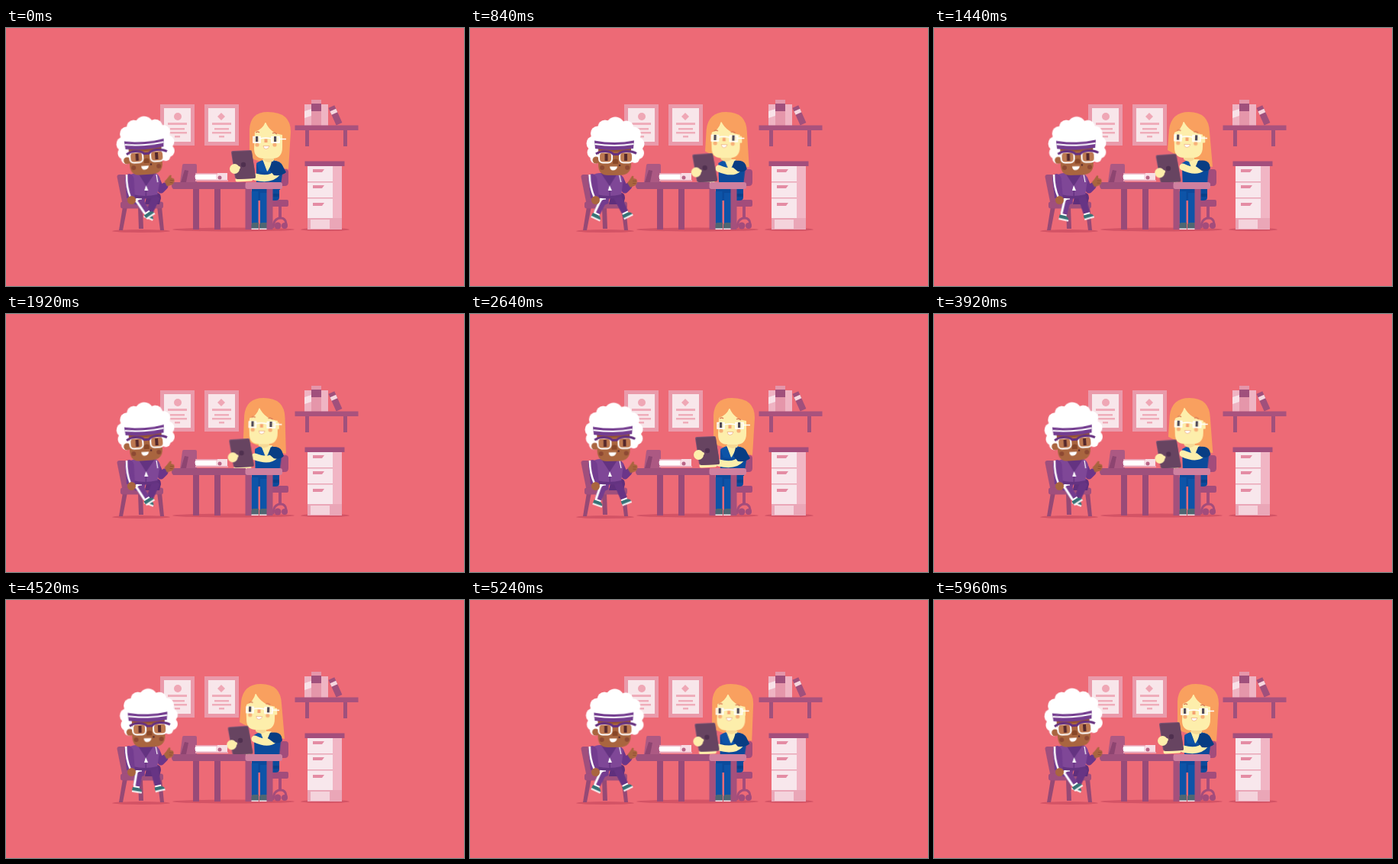
Recreate the animation shown at these times as an HTML page. Size 600x338 px, loop 6 s.

```html
<!DOCTYPE html>
<html lang="en">
<head>
<meta charset="utf-8">
<title>Consultation</title>
<style>
html, body { margin: 0; width: 100%; height: 100%; overflow: hidden; background: #ed6a76; }
svg { display: block; width: 100vw; height: 100vh; }

/* Each moving part sets its two poses: --a (start) and --b (far end). */
.man { animation: sway 1s cubic-bezier(.37,0,.63,1) infinite alternate; }
.leg { animation: kick 2s cubic-bezier(.37,0,.63,1) infinite; }
.nurse { animation: turn 3s cubic-bezier(.37,0,.63,1) infinite; }
.bend { animation: bend 3s cubic-bezier(.37,0,.63,1) infinite; }
@keyframes sway { from { transform: var(--a); } to { transform: var(--b); } }
@keyframes kick {
  0%, 100% { transform: var(--a); }
  40%, 60% { transform: var(--b); }
}
@keyframes turn {
  0%, 5.3%, 83.3%, 100% { transform: var(--a); }
  36%, 50% { transform: var(--b); }
}
@keyframes bend {
  0%, 5.3%, 83.3%, 100% { d: var(--a); }
  36%, 50% { d: var(--b); }
}

#manHead { transform-origin: 190px 180px; --a: translate(-6px,-1px) rotate(-4deg); --b: translate(.5px,0); }
#manBody { transform-origin: 181px 222px; --a: skewX(-2deg); --b: skewX(1deg); }
#thumb { transform-origin: 207px 208px; --a: translate(1px,-2px) rotate(7deg); --b: translate(0,0); }
#legL { transform-origin: 174px 226px; --a: rotate(-34deg); --b: rotate(25deg); }
#legR { transform-origin: 195px 225px; --a: rotate(23deg); --b: rotate(-26deg); }

#hairBack { --a: path("M319 133 Q320 110 343 110 Q373 110 373 136 L370 185 Q345 180 319 170 Z");
            --b: path("M308 133 Q311 110 334 110 Q360 110 361 136 L365 182 Q338 178 306 160 Z"); }
#face { --a: translate(0,0); --b: translate(-10px,-1px); }
#features { --a: translate(0,0); --b: translate(-9px,-2px) rotate(2deg); transform-origin: 341px 147px; }
#fringe { --a: path("M321 140 Q320 111 343 111 Q372 111 371 139 L368 168 L362 172 L362 140 Q346 138 340 123 Q336 133 326 136 L325 158 L321 158 Z");
          --b: path("M310 140 Q311 111 334 111 Q360 111 360 139 L362 168 L356 172 L355 140 Q335 138 327 122 Q324 134 315 137 L312 158 L308 156 Z"); }
#torso { transform-origin: 342px 212px; --a: translate(0,0); --b: translate(-2px,0) skewX(2deg); }
#sleeve { --a: path("M348 175 Q358 174 362 180 L367 189 Q362 194 351 193 L345 186 Z");
          --b: path("M346 174 Q358 172 361 179 L362 184 Q358 189 351 187 L343 181 Z"); }
#forearm { --a: path("M355 190 Q347 200 326 195"); --b: path("M351 183 Q343 190 326 182"); }
#tablet { transform-origin: 311px 179px; --a: translate(0,0); --b: translate(-4px,5px) rotate(-1.5deg); }
</style>
</head>
<body>
<svg viewBox="0 0 600 338" preserveAspectRatio="none">
  <rect width="600" height="338" fill="#ed6a76"/>

  <g fill="#d35365">
    <ellipse cx="177" cy="266" rx="38" ry="2"/>
    <ellipse cx="298" cy="264" rx="80" ry="2.5"/>
    <ellipse cx="418" cy="264" rx="32" ry="2"/>
  </g>

  <!-- certificates -->
  <defs>
    <g id="cert">
      <path fill="#ea9aaa" d="M0 0h45v54H0z"/>
      <path fill="#f8e6ea" d="M5 5h35v44H5z"/>
      <path fill="#efadba" d="M10 24h25v3H10zM13 31h19v2.500H13zM10 36h25v2.500H10zM19 41h7v2.500h-7z"/>
    </g>
  </defs>
  <use href="#cert" x="202" y="100"/>
  <circle cx="225" cy="116" r="5" fill="#efa7b5"/>
  <use href="#cert" x="260" y="100"/>
  <path fill="#efa7b5" d="M282 111l5 5-5 5-5-5z"/>

  <!-- shelf -->
  <path fill="#efb4c3" d="M391 100h9v28h-9z"/>
  <path fill="#f8e2e8" d="M391 109l9-3v9l-9 3z"/>
  <path fill="#e596aa" d="M400 94h13v34h-13z"/>
  <path fill="#a0507c" d="M400 99h13v10h-13z"/>
  <path fill="#efb4c3" d="M413 100h9v28h-9z"/>
  <g transform="rotate(-24 431 114)">
    <path fill="#a0507c" d="M427 102h8.500v25H427z"/>
    <path fill="#f6d7df" d="M427 107h8.500v5H427z"/>
  </g>
  <path fill="#a9527d" d="M378.500 127.500h83v6.500h-83z"/>
  <path fill="#a0507c" d="M392 134h5v21h-5zM442 134h5v21h-5z"/>

  <!-- cabinet -->
  <path fill="#f1b5c4" d="M395 180h45v70h-45z"/>
  <path fill="#eaa6b7" d="M395 250h45v14h-45z"/>
  <path fill="#f8e7ec" d="M395 181h33v68h-33z"/>
  <path fill="#f4d3dc" d="M399 251h25v12h-25z"/>
  <path fill="#eaa6b7" d="M395 201h33v1.500h-33zM395 222h33v1.500h-33zM395 249h45v2h-45z"/>
  <path fill="#e48ca4" d="M402 185h15l-3 4h-12zM402 206h15l-3 4h-12zM402 229h15l-3 4h-12z"/>
  <path fill="#a34e7c" d="M391.500 174.500h52v6.500h-52z"/>

  <!-- office chair -->
  <g fill="#a34c7b">
    <path d="M357 185h9q4 0 4 4v13q0 5-5 5h-8z"/>
    <rect x="343" y="225" width="27" height="9" rx="2"/>
    <path d="M357 233h4v16h-4z"/>
    <path d="M350 262q0-13 10-13q7 0 7 9" fill="none" stroke="#a34c7b" stroke-width="3"/>
    <circle cx="356" cy="259" r="4.500"/>
    <circle cx="365" cy="259" r="4"/>
  </g>

  <!-- nurse -->
  <path class="bend" id="hairBack" fill="#f9a05f"/>
  <g id="nurseLegs">
    <path fill="#0b4a9b" d="M322 210h36v12q0 4-5 4h-25l-6-4z"/>
    <path fill="#0d54a8" d="M321.500 214h9v42h-9zM333 216h9v40h-9z"/>
    <path fill="#08408a" d="M342 217h16v4h-16z"/>
    <path fill="#4f6672" d="M321 264v-6q0-3 4-3h6v9zM332 264v-6q0-3 4-3h6v9z"/>
    <path fill="#f8e5eb" d="M321 262.500h10v1.500h-10zM332 262.500h10v1.500h-10z"/>
  </g>
  <g class="nurse" id="torso">
    <path fill="#0b4a9b" d="M328 179q2-5 9-5h17q9 2 9 11l-4 27h-31z"/>
    <path fill="#fdeeab" d="M336 172h15l-4 13-5 3z"/>
    <path fill="#0d54a8" d="M336 173l-8 4 4 11 10 1zM351 173l3 3-7 13h-5z"/>
  </g>
  <g class="nurse" id="face">
    <path fill="#f6d995" d="M337 164h14v9q-7 6-14 0z"/>
    <path fill="#fdeeab" d="M324 124h38v32q0 15-13 15h-11q-13 0-13-13z"/>
    <circle cx="363" cy="147" r="4.500" fill="#fdeeab"/>
  </g>
  <path class="bend" id="fringe" fill="#f9a05f"/>
  <g class="nurse" id="features">
    <g fill="#f7b077">
      <circle cx="329" cy="153" r="2.600"/>
      <circle cx="352" cy="153" r="2.600"/>
    </g>
    <path fill="none" stroke="#dc7f58" stroke-width="1.400" d="M327 137q3-2 5 0M349 138q3-2 6 1"/>
    <path fill="#fff" fill-opacity=".45" stroke="#fff" stroke-width="1.500" d="M324 142.500h9v7.500h-9zM348 142.500h10v7.500h-10z"/>
    <path fill="none" stroke="#fff" stroke-width="1.500" d="M333 145q7-2 15 0M358 145.500h9"/>
    <path fill="#514b58" d="M327 142h3.200v7H327zM351 142h3.200v7H351z"/>
    <path fill="#f5a271" d="M338.500 145.500h4v4.500h-4z"/>
    <path fill="#fff" stroke="#e99a69" stroke-width=".6" d="M337 154.500h8q-1 4-4.500 4q-3 0-3.500-4z"/>
  </g>
  <path class="bend" id="forearm" fill="none" stroke="#fdeeab" stroke-width="9" stroke-linecap="round"/>
  <path class="bend" id="sleeve" fill="#083d83"/>
  <g class="nurse" id="tablet">
    <path d="M303 199l18-1" stroke="#fdeeab" stroke-width="5" stroke-linecap="round"/>
    <path fill="#7e5474" d="M295 163q0-2 2-2l23-1q2 0 2 2l5 33q0 2-2 2l-22 1q-2 0-3-2z"/>
    <path fill="#674461" d="M296 164q0-2 2-2l22-1q2 0 2 2l5 32q0 2-2 2l-21 1q-2 0-3-2z"/>
    <circle cx="311" cy="179" r="3.200" fill="#4f304f"/>
    <circle cx="299.500" cy="184.500" r="6.500" fill="#fdeeab"/>
    <path d="M300 183h5" stroke="#fdeeab" stroke-width="4" stroke-linecap="round"/>
  </g>

  <!-- desk -->
  <path fill="#994a78" d="M245 210h8v54h-8zM273 210h8v54h-8z"/>
  <path fill="#a4507c" d="M313.500 210h8v54h-8zM341.500 210h8v54h-8z"/>
  <path fill="#9f507c" d="M219 202h95v9h-95q-4-4 0-9z"/>
  <rect x="313.500" y="202" width="48.500" height="9" rx="3" fill="#d0809f"/>
  <path fill="#ac5983" d="M231 180q0-2 2-2h15q2 0 2 2v22h-22z"/>
  <path fill="#8d4571" d="M234 186l5 1-3 15h-7z"/>
  <path fill="#f7dce4" d="M250 190h40v10h-40q-5-5 0-10z"/>
  <path fill="#fff" d="M248 192h27v6h-27z"/>
  <path fill="#eba0b2" d="M248 190h29v1.500h-29zM248 199h43v2h-43z"/>
  <circle cx="280" cy="196" r="2.500" fill="#b96487"/>

  <!-- visitor chair -->
  <path fill="#a04f7d" d="M145.500 195q0-3 3-3h10l7 38h-13z"/>
  <path fill="#964975" d="M153 234h6l-6 31h-5zM198 234h6l3 31h-5zM173 235h6l1 28h-6z"/>
  <rect x="150" y="227.500" width="56" height="9" rx="3" fill="#a04f7d"/>

  <!-- visitor -->
  <defs>
    <g id="shin">
      <path fill="#fff" d="M-4 17h8v4h-8z"/>
      <path fill="#377276" d="M-5 20h8q5 1 5 6H-5z"/>
      <path fill="#fff" d="M-5 24.500H8v2H-5z"/>
      <path d="M-5-4Q0-7 5-4l-.5 22h-9z"/>
    </g>
  </defs>
  <path fill="#5f2f7c" d="M185 216h14q4 1 4 7l-2 8h-19z"/>
  <g class="leg" id="legR" fill="#673484"><use href="#shin" x="195" y="225"/></g>
  <path fill="#733c8f" d="M164 217h20l-3 13q-8 4-14 0z"/>
  <g class="leg" id="legL" fill="#733c8f">
    <use href="#shin" x="174" y="226"/>
    <path fill="#fff" d="M169.500 224h3v20h-3z"/>
  </g>
  <path fill="#fff" d="M168 227q0-5 10-5v2.500q-6 0-7 4z"/>

  <path fill="none" stroke="#6b3589" stroke-width="9" stroke-linecap="round" stroke-linejoin="round" d="M197 198l6 14 5-5"/>
  <g class="man" id="thumb" fill="#a9653f">
    <path d="M206 203l3-4 3-5q3-1 2 3l4 1q2 4-1 8l-7 3z"/>
    <path fill="#8f4f34" d="M213 200h5v1h-5zM213 203h4v1h-4z"/>
  </g>
  <g class="man" id="manBody">
    <path fill="#7f4797" d="M160 196q2-6 10-6h24q6 2 7 8l-3 22q-17 5-32 0l-6-7z"/>
    <path fill="#643381" d="M172 190h22l-11 17zM182.500 206h1.500v16h-1.500zM166 218q16 4 32 0v4q-16 3-32 0z"/>
    <path fill="#fff" d="M183 206l3 7h-5z"/>
    <path fill="#733c8f" d="M155 198q0-7 6-7q6 2 6 9l2 23h-11z"/>
    <path fill="none" stroke="#fff" stroke-width="2.500" d="M157 192q0 16 6 30"/>
    <path fill="none" stroke="#fff" stroke-width="1.200" d="M196 192l2 10"/>
  </g>
  <circle cx="164.500" cy="225.500" r="5.500" fill="#a9653f"/>

  <g class="man" id="manHead">
    <g fill="#fff">
      <path d="M163 138l14-12h26l13 12 4 32h-60z"/>
      <circle cx="167.500" cy="138" r="9.500"/>
      <circle cx="177" cy="130" r="9.500"/>
      <circle cx="190.500" cy="128.500" r="12"/>
      <circle cx="205" cy="131" r="9.500"/>
      <circle cx="214.500" cy="139" r="9.500"/>
      <circle cx="219.500" cy="152" r="9"/>
      <circle cx="162" cy="151" r="9.500"/>
      <circle cx="161.500" cy="163" r="8"/>
      <circle cx="220" cy="164" r="8"/>
      <circle cx="164" cy="171" r="6.500"/>
      <circle cx="216" cy="171" r="6"/>
    </g>
    <path fill="#a9653f" d="M168 153h43v25q0 15-15 15h-15q-13 0-13-14z"/>
    <circle cx="165" cy="173" r="4.500" fill="#a9653f"/>
    <path fill="#925230" d="M169 158q20 4 42 0v2q-20 4-42 0z"/>
    <path fill="#733c8f" d="M163 147.500q27 5 52 0l-1 10.500q-26 4-50 0z"/>
    <path fill="none" stroke="#fff" stroke-width="2" d="M163.500 152q26 4 51 0"/>
    <g fill="#bd7850" stroke="#fff" stroke-width="2">
      <rect x="169" y="162.500" width="17" height="14" rx="5"/>
      <rect x="196" y="162.500" width="17" height="14" rx="5"/>
    </g>
    <path fill="#54282c" d="M176.500 165h4v9h-4zM202 165h4v9h-4z"/>
    <path fill="none" stroke="#65307f" stroke-width="3" stroke-linejoin="round" d="M165 165q5-4 13-3.500 7 .5 10 4h6q3-3.500 10-4 8-.5 14 3"/>
    <path fill="#884728" d="M187 173q4-3 7 0v5h-7z"/>
    <g fill="#8d4933">
      <circle cx="173" cy="183" r="3"/>
      <circle cx="206" cy="183" r="3"/>
    </g>
    <circle cx="196" cy="180" r="1.300" fill="#54282c"/>
    <path fill="#fff" d="M183 181.500h10q-1 5-6 5q-3.500 0-4-5z"/>
  </g>
</svg>
</body>
</html>
```
